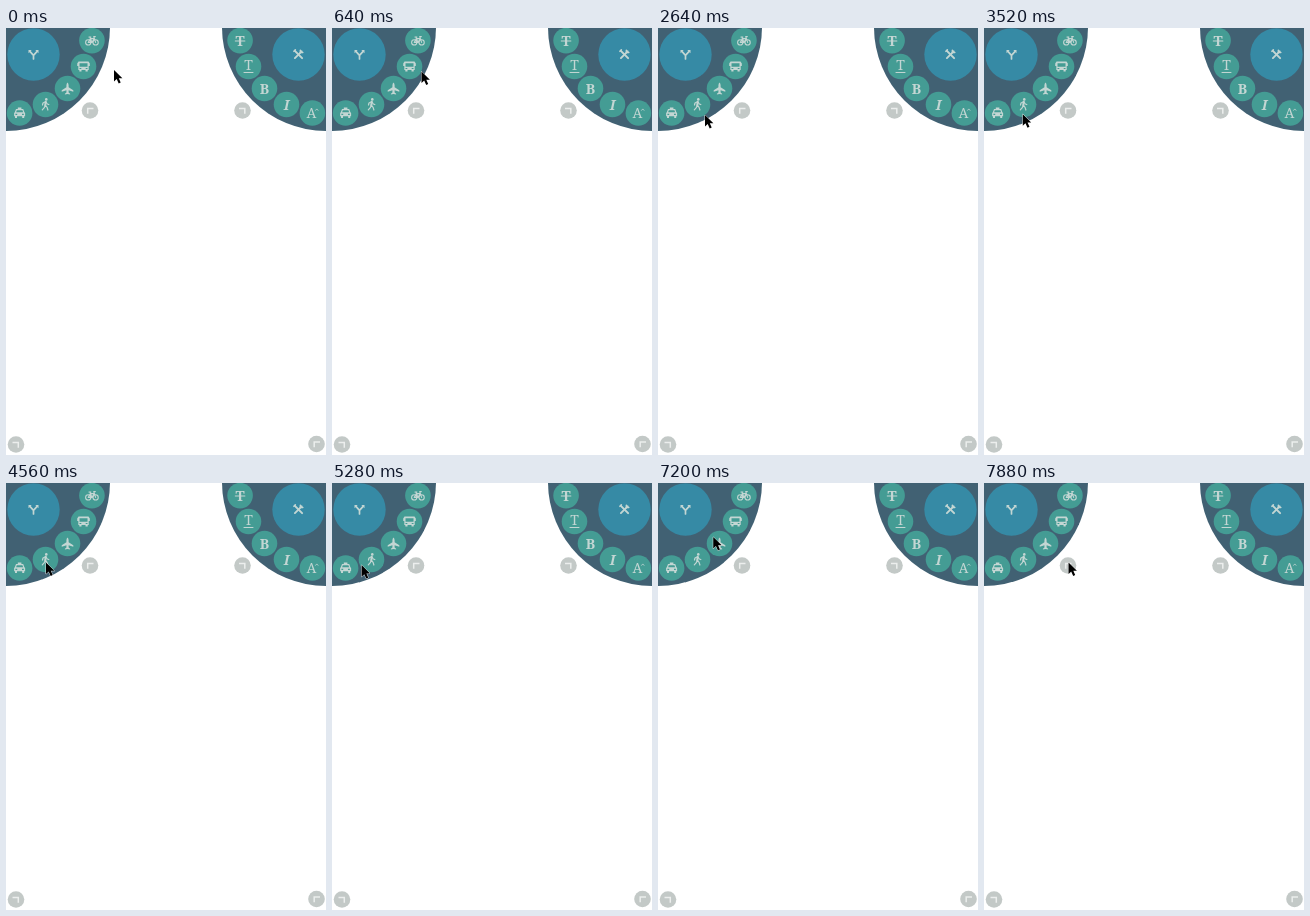
Animation of 320x427 px, one loop 8 s. Source, as an HTML page:

```html
<!DOCTYPE html>
<html lang="en">
<head>
<meta charset="utf-8">
<title>Corner menus</title>
<style>
  html, body { margin: 0; width: 100%; height: 100%; overflow: hidden; background: #fff; }
  svg { display: block; width: 100vw; height: 100vh; }
  text { font-family: "Noto Serif", serif; font-size: 14px; text-anchor: middle; fill: #c3d6d3; }
  .icon { fill: #c3d6d3; stroke: none; }
  .line { fill: none; stroke: #c3d6d3; stroke-width: 1.2; stroke-linecap: round; stroke-linejoin: round; }
  .hole { fill: #449c94; }
</style>
</head>
<body>
<svg id="stage" viewBox="0 0 320 427">
  <g id="menus"></g>
  <g id="corners"></g>
  <path id="cursor" d="M0 0V11.6L2.7 9.1 4.7 13.5 6.7 12.6 4.8 8.3H8.4Z"
        fill="#000" stroke="#fff" stroke-width=".8" paint-order="stroke"/>
</svg>
<script>
const LOOP = 8000;
const byId = id => document.getElementById(id);
const at = (x, y, content) => `<g transform="translate(${x} ${y})">${content}</g>`;
const disc = (r, fill) => `<circle r="${r}" fill="${fill}"/>`;
const shape = d => `<path class="icon" d="${d}"/>`;
const line = (d, width = 1.2) => `<path class="line" style="stroke-width:${width}" d="${d}"/>`;
const hole = d => `<path class="hole" d="${d}"/>`;
const letter = (char, style = '') => `<text y="5" style="${style}">${char}</text>`;

const travelIcons = [
  // bicycle
  line('M-6.3 1.8a2.6 2.6 0 1 0 5.2 0a2.6 2.6 0 1 0-5.2 0M1.1 1.8a2.6 2.6 0 1 0 5.2 0a2.6 2.6 0 1 0-5.2 0' +
       'M-3.7 1.8L-1.6-2H2.4L0 1.8H-3.7M0 1.8L-2-3.6M-3-3.6H-1M3.7 1.8L1.8-4H3.4', 1.1),
  // bus
  shape('M-5-5H5L6.3-3V-.5H5.2V3.5H4.2V5H2V3.5H-2V5H-4.2V3.5H-5.2V-.5H-6.3V-3Z') +
    hole('M-4-3.2H4V.2H-4ZM-4 1.4H-2.2V2.5H-4ZM2.2 1.4H4V2.5H2.2Z'),
  // plane
  shape('M0-6Q1.1-5 1.1-3V-1.3L5.8 1.7V3.2L1.1 1.8V4L2.6 5.2V6L0 5.4-2.6 6V5.2L-1.1 4V1.8L-5.8 3.2V1.7L-1.1-1.3V-3Q-1.1-5 0-6Z'),
  // pedestrian
  '<circle class="icon" cx=".8" cy="-5.1" r="1.3"/>' +
    line('M.2-2.7L-.3 1.2', 2) + line('M0-2.8L-2.5-1.5-3 .5M.6-2.4L1.8-.5 3.3 0M-.2 1.3L-1.4 3.4-3.2 5.4M0 1L1.6 2.8 2.4 5.5'),
  // taxi
  shape('M-1.8-5.5H1.8V-4H3.6L4.8-.8 5.5 0V3.4H4.6V5H2.6V3.4H-2.6V5H-4.6V3.4H-5.5V0L-4.8-.8-3.6-4H-1.8Z') +
    hole('M-2.8-2.7H2.8L3.5-.7H-3.5ZM-4.2.7H-2.4V2H-4.2ZM2.4.7H4.2V2H2.4Z')
];

const textIcons = [
  letter('T', 'font-weight:700') + line('M-4.8.4H4.8', 1),
  at(0, -1, letter('T')) + line('M-4.5 6H4.5', 1),
  letter('B', 'font-weight:700'),
  letter('I', 'font-weight:600;font-style:italic'),
  at(-1, 0, letter('A')) + line('M3.2-2.6L4.4-4 5.6-2.6', .8)
];

const forkIcon = line('M0 4.5V.8L-3.4-2.8M0 .8L3.4-2.8', 1.7) + shape('M-5-4.5H-1.8L-5-1.2ZM5-4.5H1.8L5-1.2Z');
const toolsIcon = line('M-3.4-3.4L3.6 3.6', 2) + line('M3.2-3.2L-3.6 3.6', 1.9) +
  line('M1.9-4.3V-2H4.3M-4.6-3.2L-3.2-4.6', 1.6);

// Items sit every 18 degrees on an arc around a top corner of the stage.
function menu(cornerX, side, hubIcon, icons) {
  const items = icons.map((icon, i) => {
    const angle = (9 + 18 * i) * Math.PI / 180;
    return at(side * 87 * Math.cos(angle), 87 * Math.sin(angle), disc(12.8, '#449c94') + icon);
  }).join('');
  const hub = at(side * 27.5, 27.5, disc(26.2, '#368aa5') + hubIcon);
  return at(cornerX, -1, disc(104, '#416173') + hub + items);
}

byId('menus').innerHTML = menu(0, 1, forkIcon, travelIcons) + menu(320, -1, toolsIcon, textIcons);

const cornerButton = (x, y, side) => at(x, y, disc(8.3, '#c3c9c7') +
  `<path d="M${-side * 2.3} 3.2V-2H${side * 3.5}" fill="none" stroke="#eceeed" stroke-width="1.5"/>`);
byId('corners').innerHTML = cornerButton(84, 82.5, 1) + cornerButton(236.5, 82.5, -1) +
  cornerButton(10, 416.5, -1) + cornerButton(310.5, 416, 1);

// Pointer stops: time, x, y
const stops = [
  [0, 108, 42], [40, 108, 42], [640, 89.5, 43.5], [1480, 80, 41], [1720, 80, 41],
  [2040, 81, 48.5], [2520, 51, 84], [2640, 47, 87], [3000, 39, 87], [3280, 39, 87],
  [4080, 38, 83], [4400, 38, 83], [4560, 40, 79.5], [5200, 30, 82], [6040, 14, 86],
  [6360, 34, 35.5], [6840, 34, 35.5], [7640, 84, 79], [7880, 84.5, 79.5], [LOOP, 84.5, 79.5]
];

function draw(now) {
  const time = Math.floor(now % LOOP / 40) * 40;
  const next = stops.findIndex(stop => stop[0] > time);
  const [t0, x0, y0] = stops[next - 1], [t1, x1, y1] = stops[next];
  const p = (time - t0) / (t1 - t0), eased = p * p * (3 - 2 * p);
  byId('cursor').setAttribute('transform',
    `translate(${x0 + (x1 - x0) * eased} ${y0 + (y1 - y0) * eased})`);
}

const start = performance.now();
function tick() {
  draw(performance.now() - start);
  requestAnimationFrame(tick);
}
tick();
</script>
</body>
</html>
```
